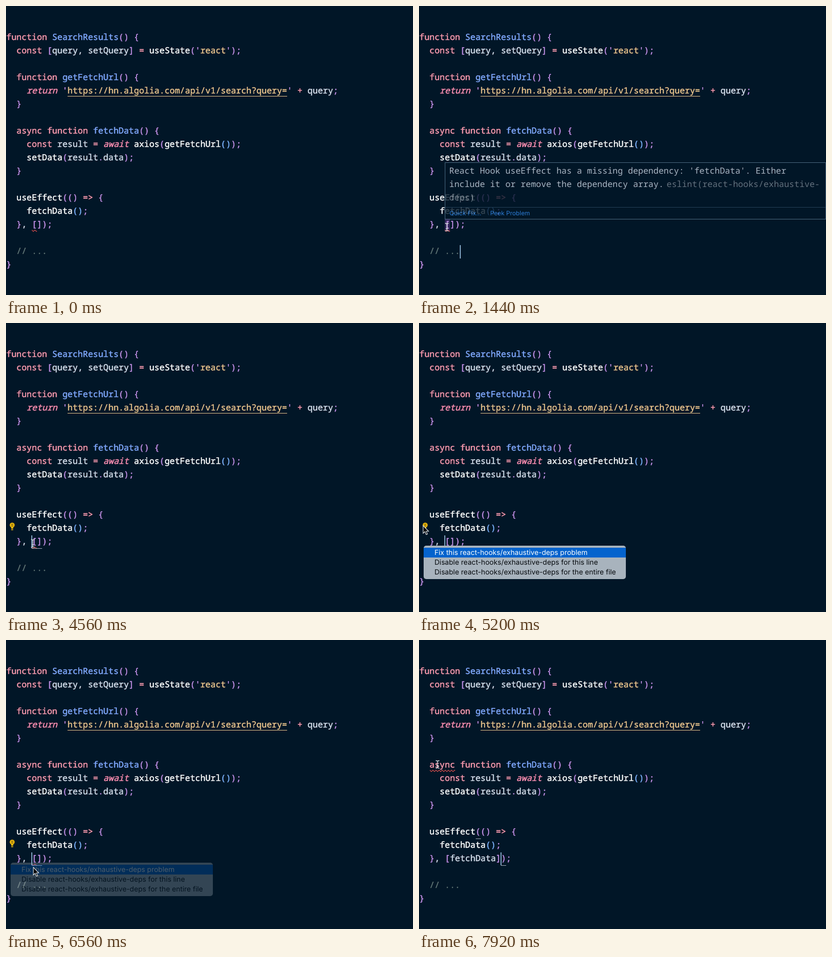
Recreate the animation shown at these times as an HTML page with a canvas. Size 789 px wide and 562 px high, loop 8 s.

```html
<!DOCTYPE html>
<html lang="en">
<head>
<meta charset="utf-8">
<title>Editor quick fix</title>
<style>
  html, body { margin: 0; width: 100%; height: 100%; overflow: hidden; background: #011627; }
  canvas { display: block; width: 789px; height: 562px; }
</style>
</head>
<body>
<canvas id="stage" width="789" height="562"></canvas>
<script>
const WIDTH = 789, HEIGHT = 562;
const LOOP = 8000, TICK = 80;
const COL = 9.9, ROW = 26, LEFT = 0.5, BASE = 66;
const BG = '#011627', CARET = '#80a4c2', MATCH = '#a3adb8';
const MONO = '500 16.5px "Noto Sans Mono", "DejaVu Sans Mono", monospace';
const SANS = 'Inter, Roboto, sans-serif';

// The first letter of every segment picks its colour.
const COLORS = {
  k: '#ff9cb0', i: '#ff8fb2', f: '#82aaff', p: '#c792ea', v: '#d6deeb',
  w: '#ffffff', s: '#ecc48d', c: '#637777', b: '#7fb5ff'
};
const CODE = [
  'kfunction |fSearchResults|p() {',
  'k  const |p[|vquery, setQuery|p] |k= |wuseState|p(\'|sreact|p\');',
  '',
  'k  function |fgetFetchUrl|p() {',
  'i    return |p\'|shttps://hn.algolia.com/api/v1/search?query=|p\' |k+ |vquery|p;',
  'p  }',
  '',
  'k  async function |ffetchData|p() {',
  'k    const |vresult |k= |iawait |waxios|p(|wgetFetchUrl|b()|p);',
  'w    setData|p(|vresult|p.|vdata|p);',
  'p  }',
  '',
  'w  useEffect|p(() |k=> |p{',
  'w    fetchData|b()|p;',
  'p  }|v, |p[|vDEPS|p]);',
  '',
  'c  // ...',
  'p}'
];
const MENU = [
  'Fix this react-hooks/exhaustive-deps problem',
  'Disable react-hooks/exhaustive-deps for this line',
  'Disable react-hooks/exhaustive-deps for the entire file'
];
const POINTER = [
  [240, 92, 526], [560, 66, 470], [640, 66, 470], [1200, 54, 430], [4480, 54, 430],
  [5120, 8, 394], [5520, 8, 394], [5840, 32, 440], [6080, 32, 440],
  [6400, 53, 442], [7360, 53, 442], [7920, 36, 242]
];

const stage = document.getElementById('stage').getContext('2d');
const layer = document.createElement('canvas').getContext('2d');
layer.canvas.width = WIDTH;
layer.canvas.height = HEIGHT;
stage.textRendering = layer.textRendering = 'geometricPrecision';
let ctx = stage;

const within = (t, from, to) => t >= from && t < to;
const colX = col => LEFT + col * COL;

// Paints a popup as one group so that its parts fade together.
function fade(alpha, paint) {
  if (!alpha) return;
  layer.clearRect(0, 0, WIDTH, HEIGHT);
  ctx = layer;
  paint();
  ctx = stage;
  ctx.globalAlpha = alpha;
  ctx.drawImage(layer.canvas, 0, 0);
  ctx.globalAlpha = 1;
}

function rect(x, y, w, h, color) {
  ctx.fillStyle = color;
  ctx.fillRect(x, y, w, h);
}

function text(str, x, y, color, font) {
  ctx.font = font;
  ctx.fillStyle = color;
  ctx.fillText(str, x, y);
}

function codeText(str, x, y, color, italic) {
  text(str, x, y, color, (italic ? 'italic ' : '') + MONO);
  ctx.strokeStyle = color;
  ctx.lineWidth = 0.45;
  ctx.strokeText(str, x, y);
}

function drawCode(fixed) {
  CODE.forEach((line, row) => {
    let col = 0;
    for (const part of line.split('|')) {
      const str = part.slice(1).replace('DEPS', fixed ? 'fetchData' : '');
      codeText(str, colX(col), BASE + row * ROW, COLORS[part[0]], part[0] === 'i');
      col += str.length;
    }
  });
  rect(colX(12), 175, 43 * COL, 1, COLORS.s);
}

function squiggle(x, y, w) {
  ctx.beginPath();
  for (let d = 0; d <= w; d += 0.5) {
    ctx.lineTo(x + d, y - 1.3 * Math.cos(d * Math.PI / 3));
  }
  ctx.strokeStyle = '#ef5350';
  ctx.lineWidth = 1.1;
  ctx.stroke();
}

function drawHover() {
  rect(50, 304, 739, 111, '#5f7e97');
  rect(51, 305, 737, 109, BG);
  rect(51, 391, 737, 1, '#2c4a62');
  text("React Hook useEffect has a missing dependency: 'fetchData'. Either", 58.5, 326, COLORS.v, MONO);
  text('include it or remove the dependency array.', 58.5, 352, COLORS.v, MONO);
  text('eslint(react-hooks/exhaustive-', 480, 352, '#7d8894', MONO);
  text('deps)', 58.5, 378, '#7d8894', MONO);
  text('Quick Fix...', 59, 407, '#3794ff', '11.8px ' + SANS);
  text('Peek Problem', 138, 407, '#3794ff', '11.8px ' + SANS);
}

function drawMenu() {
  ctx.beginPath();
  ctx.roundRect(9, 433, 392, 65, 5);
  ctx.fillStyle = '#a8b3bd';
  ctx.fill();
  rect(9, 437, 392, 19, '#0463cd');
  MENU.forEach((label, i) => {
    text(label, 30, 451 + i * 19, i ? '#05090d' : '#ffffff', '13.65px ' + SANS);
  });
}

function drawBulb() {
  ctx.beginPath();
  ctx.arc(12, 393, 4.8, 0, Math.PI * 2);
  ctx.fillStyle = '#e9b50b';
  ctx.fill();
  rect(10, 397, 4, 3, '#e9b50b');
  rect(10, 401, 4, 2, '#c49a12');
  rect(10, 391, 4, 1, '#4a3d12');
  rect(10, 394, 4, 1, '#4a3d12');
}

function pointerAt(t) {
  const next = POINTER.findIndex(p => p[0] > t);
  if (next < 0) return POINTER[POINTER.length - 1].slice(1);
  const [t0, x0, y0] = POINTER[next - 1], [t1, x1, y1] = POINTER[next];
  const u = (t - t0) / (t1 - t0), e = u * u * (3 - 2 * u);
  return [x0 + (x1 - x0) * e, y0 + (y1 - y0) * e];
}

function drawArrow(x, y) {
  const outline = [[0, 0], [0, 15], [3.4, 11.8], [6, 17.5], [8.4, 16.4], [6, 11], [10.6, 11]];
  ctx.beginPath();
  outline.forEach(([dx, dy]) => ctx.lineTo(x + dx, y + dy));
  ctx.closePath();
  ctx.fillStyle = '#05070a';
  ctx.strokeStyle = '#e6e9ec';
  ctx.lineWidth = 1.1;
  ctx.fill();
  ctx.stroke();
}

function drawBeam(x, y) {
  ctx.beginPath();
  for (const s of [-1, 1]) {
    ctx.moveTo(x - 3.5, y + s * 7.5);
    ctx.quadraticCurveTo(x, y + s * 7.5, x, y + s * 5);
    ctx.quadraticCurveTo(x, y + s * 7.5, x + 3.5, y + s * 7.5);
  }
  ctx.moveTo(x, y - 6);
  ctx.lineTo(x, y + 6);
  ctx.moveTo(x - 2, y + 3);
  ctx.lineTo(x + 2, y + 3);
  ctx.strokeStyle = '#d5d9dd';
  ctx.lineWidth = 1.3;
  ctx.stroke();
}

function drawCaret(t, fixed) {
  if (t < 4080) {
    if (t >= 400 && Math.floor((t - 400) / 480) % 2 === 0) rect(79, 465, 2, 26, CARET);
  } else if (!fixed) {
    rect(49, 413, 2, 25, CARET);
  } else if (!within(t, 7200, 7680)) {
    rect(158, 413, 2, 25, CARET);
  }
}

function drawBrackets(t, fixed) {
  if (within(t, 4080, 6720)) rect(50, 438, 20, 1, MATCH);
  if (fixed) {
    rect(110, 386, 10, 1, MATCH);
    rect(159, 438, 10, 1, MATCH);
  }
}

function hoverAlpha(t) {
  if (!within(t, 1360, 4160)) return 0;
  return t < 1440 ? 0.4 : t < 1520 ? 0.8 : t < 4080 ? 1 : 0.4;
}

function menuAlpha(t) {
  if (!within(t, 5200, 6640)) return 0;
  return t < 6480 ? 1 : t < 6560 ? 0.7 : 0.3;
}

function draw(t) {
  const fixed = t >= 6720;
  rect(0, 0, WIDTH, HEIGHT, BG);
  if (within(t, 1360, 4080)) rect(50, 413, 10, 25, '#32285a');
  drawCode(fixed);
  if (!fixed) squiggle(50, 437, 10);
  if (t >= 6880) squiggle(21, 254.5, 49);
  drawBrackets(t, fixed);
  drawCaret(t, fixed);
  if (within(t, 4320, 6720)) drawBulb();
  fade(hoverAlpha(t), drawHover);
  fade(menuAlpha(t), drawMenu);
  if (t >= 240) {
    const [x, y] = pointerAt(t);
    const arrow = within(t, 4560, 6720) && (t >= 5120 || x < 20);
    (arrow ? drawArrow : drawBeam)(x, y);
  }
}

const start = performance.now();
function frame() {
  const t = (performance.now() - start) % LOOP;
  draw(Math.floor(t / TICK) * TICK);
  requestAnimationFrame(frame);
}
frame();
</script>
</body>
</html>
```
